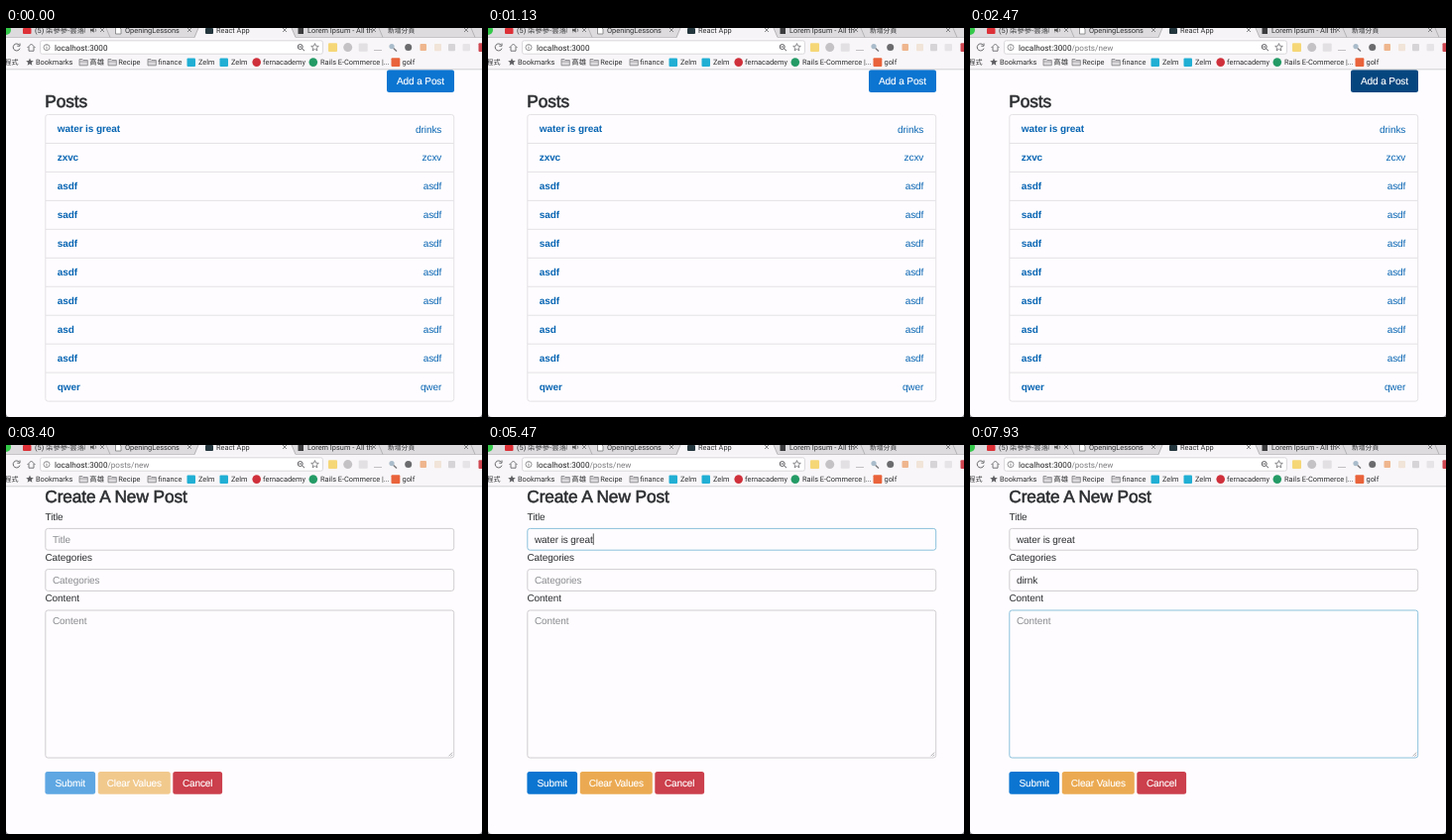
Write an HTML page that moves like this. It is 480 px wide and 393 px high and loops after 8000 ms.

```html
<!DOCTYPE html>
<html lang="en">
<head>
<meta charset="utf-8">
<title>Posts</title>
<style>
html, body { margin: 0; width: 100%; height: 100%; overflow: hidden; background: #fefcfe; }
svg { display: block; width: 100%; height: 100%; }
text {
  font: 10px "Liberation Sans", Arial, sans-serif; letter-spacing: -.1px;
  fill: #2c2e31; white-space: pre; text-rendering: geometricPrecision;
}
.head { font-size: 17.3px; fill: #2a2c2f; stroke: #2a2c2f; stroke-width: .55px; }
.link { fill: #0865b3; }
.bold { font-weight: bold; }
.white { fill: #fff; stroke: #fff; stroke-width: .15px; }
.hint { fill: #898b8f; }
.bar {
  font: 7.4px Roboto, "Noto Sans CJK TC", "Noto Sans CJK", sans-serif;
  letter-spacing: 0; fill: #2f2f31;
}
.url { font-size: 8.15px; fill: #222224; }
.path { fill: #7b7b7e; }
</style>
</head>
<body>
<svg viewBox="0 0 480 393" preserveAspectRatio="none">
  <rect width="480" height="393" fill="#fefcfe"/>
  <g id="list"></g>
  <g id="form"></g>
  <g id="chrome"></g>
</svg>
<script>
const LOOP = 8000;
const $ = id => document.getElementById(id);

function add(parent, tag, attrs, content) {
  const node = document.createElementNS("http://www.w3.org/2000/svg", tag);
  for (const key in attrs) node.setAttribute(key, attrs[key]);
  if (content !== undefined) node.textContent = content;
  parent.appendChild(node);
  return node;
}
const label = (parent, x, y, content, cls = "", anchor = "start") =>
  add(parent, "text", { x, y, class: cls, "text-anchor": anchor }, content);
const box = (parent, x, y, width, height, fill, rx = 0, stroke = "none") =>
  add(parent, "rect", { x, y, width, height, fill, rx, stroke });
const line = (parent, d, stroke = "#6c6c70", width = 1, fill = "none") =>
  add(parent, "path", { d, stroke, "stroke-width": width, fill });
const dot = (parent, cx, cy, r, fill, stroke = "none") =>
  add(parent, "circle", { cx, cy, r, fill, stroke });

function button(parent, x, y, width, content, fill) {
  const rect = box(parent, x, y, width, 22.8, fill, 2.5);
  label(parent, x + width / 2, y + 15, content, "white", "middle");
  return rect;
}

// Browser bar
const chrome = $("chrome");
const cross = x => line(chrome, `M${x - 2} 0l4 4m0 -4l-4 4`, "#6b6b6f", .8);

function drawTabs() {
  box(chrome, 0, 0, 480, 10, "#dddbde");
  line(chrome, "M0 9.5H480", "#c1bfc2", .8);
  line(chrome, "M190 10.4L194 0H288L292.5 10.4Z", "none", 0, "#f6f4f6");
  for (const x of [101, 288, 376, 469])
    line(chrome, `M${x} 0L${x + 4} 9.5`, "#a9a7aa", .8);
  line(chrome, "M190 9.5L194 0", "#a9a7aa", .8);
  dot(chrome, 0, 2, 5, "#35c94a");
  box(chrome, 17, 0, 8.5, 6, "#dd3037", 1);
  label(chrome, 29, 5, "(5) 柒參參-雲落時", "bar");
  box(chrome, 80, 0, 5, 8, "#dddbde");
  line(chrome, "M85 1.2h1.7l2-1.5v5l-2-1.5H85Z", "none", 0, "#555");
  line(chrome, "M90 .5q1.6 1.5 0 3.4", "#555", .7);
  line(chrome, "M110.5 -1H114L116 1V6H110.5Z", "#77777a", .8, "#fff");
  label(chrome, 120, 5, "OpeningLessons", "bar");
  box(chrome, 201, 0, 8, 6, "#23353d", 1);
  label(chrome, 212, 5, "React App", "bar");
  box(chrome, 294.5, 0, 5.5, 6, "#3b3b3d");
  label(chrome, 304, 5, "Lorem Ipsum - All th", "bar");
  label(chrome, 385, 5, "新增分頁", "bar").style.fontSize = "6.8px";
  [97, 185, 281, 371, 464].forEach(cross);
}

function drawAddress() {
  box(chrome, 0, 10, 480, 32, "#f8f6f8");
  line(chrome, "M13.4 17.2A3.5 3.5 0 1 0 14 20.6M14 15.5V18.2H11.3", "#69696c", 1);
  line(chrome, "M21.5 20L25.5 16L29.5 20M23 19V23.2H28V19", "#69696c", .9);
  box(chrome, 34.5, 12.8, 285, 13.4, "#fff", 2, "#dad8db");
  dot(chrome, 41, 19.6, 3, "none", "#77777a").setAttribute("stroke-width", .8);
  line(chrome, "M41 18.9V21.4M41 17.4V18.2", "#77777a", .8);
  dot(chrome, 296.7, 19, 2.5, "none", "#5e5e62");
  line(chrome, "M298.6 20.8L301 23.2M295.4 19H298", "#5e5e62", 1);
  star(311.5, 19.6, 4, "none", "#6d6d70");
  drawExtensions();
}

function star(cx, cy, r, fill, stroke) {
  const points = Array.from({ length: 10 }, (_, i) => {
    const a = i * Math.PI / 5, k = i % 2 ? r * .45 : r;
    return [cx + k * Math.sin(a), cy - k * Math.cos(a)];
  });
  add(chrome, "polygon", { points: points.join(" "), fill, stroke, "stroke-width": .8 });
}

function drawExtensions() {
  box(chrome, 325, 15.3, 9, 8.6, "#f5d777", 1);
  dot(chrome, 344.7, 19.6, 4.5, "#c4c2c5");
  box(chrome, 355.7, 15.5, 9, 8.2, "#e2e0e3", 1);
  line(chrome, "M371 22.5H379", "#c2c0c3", 1);
  dot(chrome, 389, 18.6, 2.6, "#a9bccb");
  line(chrome, "M390.8 20.5L394 23.4", "#77777b", 1.4);
  dot(chrome, 405.7, 19.6, 3.5, "#6b6b6e");
  box(chrome, 417.5, 16, 6.5, 7, "#efb68e", 1);
  box(chrome, 432, 16, 7, 7.2, "#f1e4d8", 1);
  box(chrome, 446, 16, 7, 7.2, "#d6d4d7", 1);
  box(chrome, 460.5, 16, 7.5, 7.2, "#e6e4e7", 1);
  box(chrome, 476.5, 15.3, 8, 8.6, "#cf4650", 1);
}

function drawBookmarks() {
  const mark = (x, content) => label(chrome, x, 37, content, "bar");
  mark(-1.5, "程式").style.fontSize = "7px";
  star(24, 34.5, 4, "#5e5e62", "none");
  mark(30, "Bookmarks");
  for (const [x, content] of [[74, "高雄"], [103, "Recipe"], [143, "finance"]]) {
    line(chrome, `M${x} 31.5h3l1 1h4.3v5.3h-8.3Z`, "#7e7e82", .8, "#dcdadd");
    line(chrome, `M${x} 34h8.3`, "#8e8d91", .7);
    mark(x + 10.3, content);
  }
  box(chrome, 182.5, 30.5, 8.5, 8.5, "#21afd4", 1);
  mark(194, "Zelm");
  box(chrome, 215.5, 30.5, 8.5, 8.5, "#21afd4", 1);
  mark(227, "Zelm");
  dot(chrome, 252.7, 34.6, 4.3, "#cf303b");
  mark(259, "fernacademy");
  dot(chrome, 309.8, 34.6, 4.3, "#249b66");
  mark(317, "Rails E-Commerce |...");
  box(chrome, 388.5, 30.3, 8.8, 8.8, "#e9633b", 1);
  mark(399.5, "golf");
  line(chrome, "M0 41.8H480", "#c8c6c9", .8);
}

drawTabs();
drawAddress();
drawBookmarks();
const url = label(chrome, 49, 22.8, "", "bar url");
add(url, "tspan", {}, "localhost:3000");
const path = add(url, "tspan", { class: "path" }, "");
line(chrome, "M0 389Q0 393 4 393H0ZM480 389Q480 393 476 393H480Z", "none", 0, "#8d8b90");

// Post list
const list = $("list");
const addButton = button(list, 384, 42.2, 68, "Add a Post", "#0b75d1");
label(list, 39.3, 79.8, "Posts", "head");
box(list, 39.8, 87.5, 411.9, 289.6, "#fefcfe", 2.5, "#e4e2e5");
const posts = [
  ["water is great", "drinks"], ["zxvc", "zcxv"], ["asdf", "asdf"], ["sadf", "asdf"],
  ["sadf", "asdf"], ["asdf", "asdf"], ["asdf", "asdf"], ["asd", "asdf"],
  ["asdf", "asdf"], ["qwer", "qwer"]
];
posts.forEach(([title, category], i) => {
  const y = 87.5 + i * 28.96;
  if (i) line(list, `M40 ${y}H451.5`, "#e4e2e5");
  label(list, 51.8, y + 17.9, title, "link bold");
  label(list, 439.2, y + 18, category, "link", "end");
});

// New post form
const form = $("form");
label(form, 39.3, 57.5, "Create A New Post", "head");

function field(name, labelY, y, height) {
  label(form, 39.5, labelY, name);
  const rect = box(form, 39.8, y, 411.9, height, "#fefcfe", 2.5, "#d0ced1");
  const text = label(form, 47, y + 14.2, name, "hint");
  const caret = box(form, 47, y + 5, .8, 11.5, "#333");
  return { name, rect, text, caret };
}
const fields = [
  field("Title", 75.6, 84.4, 21.8),
  field("Categories", 117, 125.6, 21.8),
  field("Content", 158.2, 167, 149)
];
line(form, "M446.5 314.3L450.2 310.6M448.6 314.5L450.3 312.8", "#8b8b8e", .7);
const submit = button(form, 39.4, 330, 50.7, "Submit", "");
const clear = button(form, 92.8, 330, 73, "Clear Values", "");
button(form, 168.3, 330, 49.8, "Cancel", "#cc3f4c");

// Timeline
const HOVER = 2130, PRESS = 2330, ROUTE = 2430, OPEN = 2530;
const steps = (count, start, gap) => Array.from({ length: count }, (_, i) => start + i * gap);
const acts = [
  { word: "water is great", keys: steps(14, 4200, 95), focus: 3870, blur: 6400 },
  { word: "dirnk", keys: steps(5, 6800, 120), focus: 6400, blur: 7430 },
  { word: "", keys: [], focus: 7430, blur: Infinity }
];

const ramp = (t, start, length) => {
  const k = Math.min(1, Math.max(0, (t - start) / length));
  return k * k * (3 - 2 * k);
};
const mix = (a, b, k) => `rgb(${a.map((v, i) => Math.round(v + (b[i] - v) * k))})`;
const BLUE = [11, 117, 209], DEEP = [9, 91, 164], DARK = [6, 70, 127];
const GREY = [208, 206, 209], FOCUS = [139, 193, 220];

function drawField({ name, rect, text, caret }, { word, keys, focus, blur }, t) {
  const typed = keys.filter(k => k <= t).length;
  text.textContent = typed ? word.slice(0, typed) : name;
  text.setAttribute("class", typed ? "" : "hint");
  rect.setAttribute("stroke", mix(GREY, FOCUS, ramp(t, focus, 150) - ramp(t, blur, 150)));

  const since = t - (typed ? keys[typed - 1] : focus);
  const lit = t >= focus && t < blur && Math.floor(since / 500) % 2 === 0;
  caret.setAttribute("visibility", lit ? "inherit" : "hidden");
  if (!lit) return;
  const width = typed ? text.getComputedTextLength() : 0;
  caret.setAttribute("x", 47.2 + width);
}

function draw(t) {
  const open = t >= OPEN;
  list.setAttribute("visibility", open ? "hidden" : "visible");
  form.setAttribute("visibility", open ? "visible" : "hidden");
  path.textContent = t >= ROUTE ? "/posts/new" : "";
  addButton.setAttribute("fill", t < PRESS
    ? mix(BLUE, DEEP, ramp(t, HOVER, 200))
    : mix(DEEP, DARK, ramp(t, PRESS, 100)));

  const k = ramp(t, acts[0].keys[0], 200);
  submit.setAttribute("fill", mix([94, 167, 227], BLUE, k));
  clear.setAttribute("fill", mix([241, 201, 141], [235, 170, 82], k));
  fields.forEach((f, i) => drawField(f, acts[i], t));
}

const begin = performance.now();
function tick() {
  draw((performance.now() - begin) % LOOP);
  requestAnimationFrame(tick);
}
tick();
</script>
</body>
</html>
```
